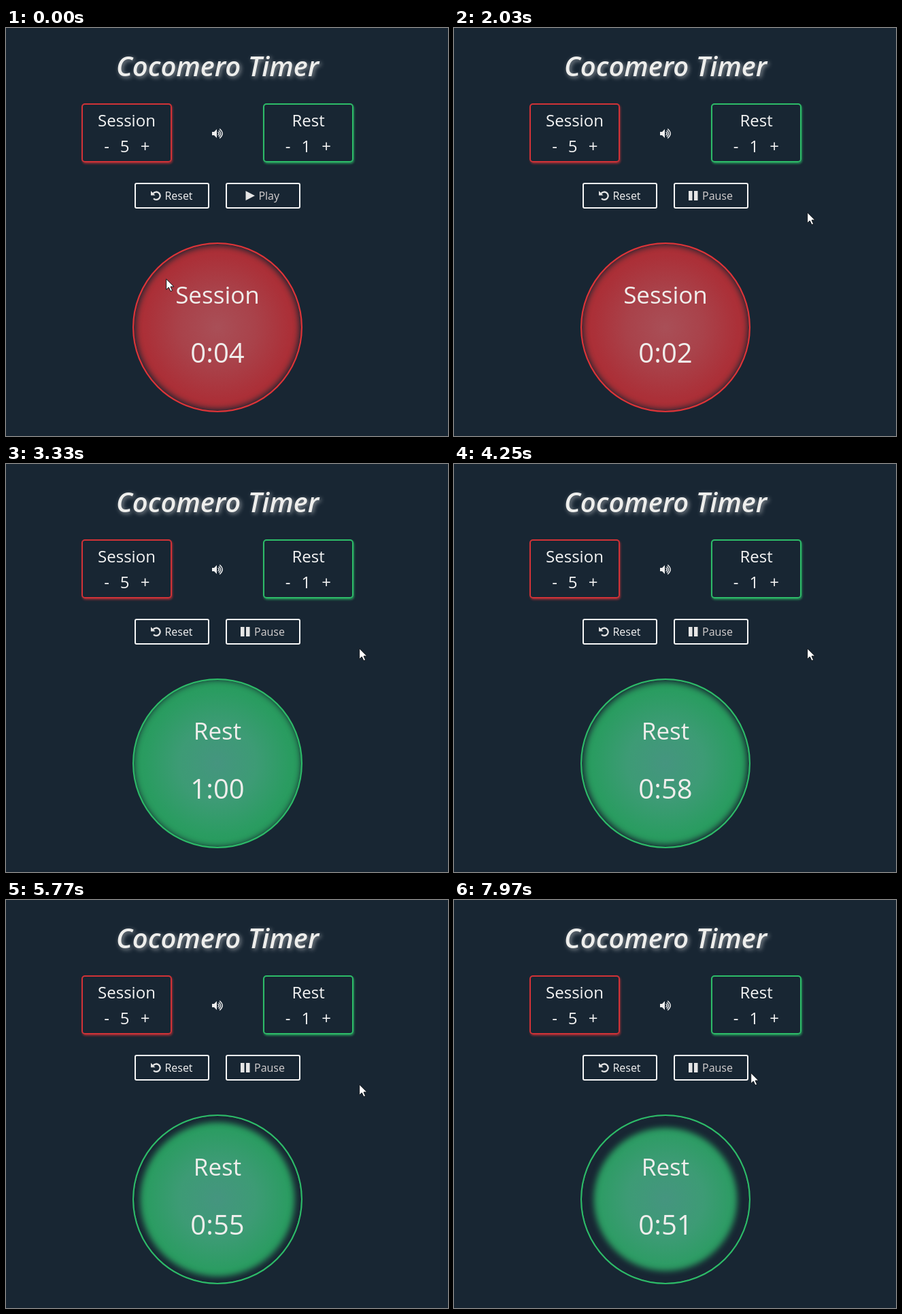
These frames come from a looping animation (650x601 px, 8 s). An HTML page:

```html
<!DOCTYPE html>
<html lang="en">
<head>
<meta charset="utf-8">
<title>Cocomero Timer</title>
<style>
  html, body { margin: 0; width: 100%; height: 100%; overflow: hidden; background: #182633; }
  #stage { position: absolute; left: 0; top: 0; width: 650px; height: 601px; overflow: hidden; }
  svg { position: absolute; left: 0; top: 0; }
  text { font-family: "Open Sans", "Noto Sans", sans-serif; fill: #f4f4f4; }
  .title { font-size: 40px; font-weight: 600; font-style: italic; fill: #eeeeec; text-shadow: 2px 2px 6px rgba(255, 255, 255, .5); }
  .setting { font-size: 24px; }
  .button { font-size: 16px; }
  .soft { fill: #d4d0d0; }
  .icon { fill: #e6e6e6; }
  .phase { font-size: 35px; fill: #f0eeec; }
  .time { font-size: 40px; fill: #f0eeec; }
  .box, #dial { position: absolute; box-sizing: border-box; border: 2px solid; }
  .box { top: 111px; width: 133px; height: 87px; border-radius: 5px; }
  #work { left: 111px; border-color: #d03237; box-shadow: 1px 2px 3px rgba(208, 50, 55, .65); }
  #pause { left: 378px; border-color: #2dbb68; box-shadow: 1px 2px 3px rgba(45, 187, 104, .65); }
  #dial { left: 186px; top: 316px; width: 250px; height: 250px; border-radius: 50%; }
  #dial.session { border-color: #df3438; background: radial-gradient(circle 125px, #a94f57, #a9424a 45%, #ab3038 85%, #ab2e34); }
  #dial.rest { border-color: #2dbb68; background: radial-gradient(circle 125px, #45957f, #3d9b75 45%, #2a9c61 85%, #279a5c); }
</style>
</head>
<body>
<div id="stage">
  <div class="box" id="work"></div>
  <div class="box" id="pause"></div>
  <div id="dial" class="session"></div>
  <svg width="650" height="601" viewBox="0 0 650 601">
    <text class="title" x="311" y="71" text-anchor="middle">Cocomero Timer</text>

    <g class="setting" text-anchor="middle">
      <text x="177.5" y="145">Session</text>
      <text x="148" y="183">-</text><text x="174.7" y="183">5</text><text x="204.5" y="183">+</text>
      <text x="444.5" y="145">Rest</text>
      <text x="414.5" y="183">-</text><text x="441.3" y="183">1</text><text x="471" y="183">+</text>
    </g>

    <g fill="none" stroke="#eeeeee" stroke-width="1.4" stroke-linecap="round">
      <path d="M303 153h3l4-4v13l-4-4h-3z" fill="#eeeeee" stroke="none"/>
      <path d="M312 153.4q2.3 2.1 0 4.2M313.3 151.2q4.6 4.3 0 8.6M314.6 149q7.2 6.5 0 13"/>
    </g>

    <g fill="none" stroke="#f6f6f6" stroke-width="2">
      <rect x="190" y="229" width="108" height="36" rx="2"/>
      <rect x="324" y="229" width="108" height="36" rx="2"/>
    </g>
    <path d="M216.5 243.7A5.7 5.7 0 1 1 217 251.3" fill="none" stroke="#e6e6e6" stroke-width="2.3"/>
    <path class="icon" d="M213 240v6.5h6.5z"/>
    <text class="button" x="233.4" y="253">Reset</text>
    <path id="mark" class="icon"/>
    <text id="action" class="button soft" y="253"></text>

    <text id="phase" class="phase" x="311" y="406" text-anchor="middle"></text>
    <text id="clock" class="time" x="311" y="493" text-anchor="middle"></text>

    <g id="arrow">
      <path d="M.7 .8V16.4L4.3 13L7 18.8L9.6 17.6L7 12H11.8Z" fill="#fff" stroke="#10161c" stroke-width="1"/>
    </g>
    <g id="hand">
      <path d="M5 13V2.5Q5 .6 6.6 .6T8.2 2.5V8Q8.5 6.8 9.8 7T11 8.5Q11.6 7.4 12.7 7.8T13.7 9.3Q14.5 8.5 15.4 9T16.4 11V15Q16.3 17.5 14.7 19V21.4H7V19.2L1.2 13.4Q0 11.7 1.3 11T3.6 11.6Z"
        fill="#fff" stroke="#10161c" stroke-width="1"/>
      <path d="M8.2 8v4M11 8.5V12M13.7 9.3V12.4" stroke="#10161c" stroke-width=".9"/>
    </g>
  </svg>
</div>
<script>
const LOOP = 8000, PRESS = 790, REST = 3330;
const $ = id => document.getElementById(id);

// Moments at which the countdown drops by one second
const workTicks = [1580, 2030, 2510, 2820];
const restTicks = [3760, 4250, 4850, 5310, 5770, 6230, 6700, 7330, 7800];

// Pointer stops: start time, x, y, shape
const stops = [
  [0, 235, 369, "arrow"], [170, 305, 309, "arrow"], [320, 329, 272, "arrow"],
  [470, 331, 262, "hand"], [640, 343, 248, "hand"], [960, 343, 246, "hand"],
  [1110, 347, 245, "hand"], [1260, 471, 258, "arrow"], [1430, 519, 271, "arrow"],
  [7970, 436, 254, "arrow"]
];

const passed = (ticks, t) => ticks.filter(x => x <= t).length;

function drawDial(t) {
  const rest = t >= REST;
  const gone = passed(restTicks, t);
  const left = rest ? 60 - gone : 4 - passed(workTicks, t);
  const spread = rest ? Math.max(0, gone * 2.06 - 1) : 1 + left * 125 / 300;
  $("dial").className = rest ? "rest" : "session";
  $("dial").style.boxShadow = `inset 0 0 9px ${spread}px #182633`;
  $("phase").textContent = rest ? "Rest" : "Session";
  $("clock").textContent = Math.floor(left / 60) + ":" + String(left % 60).padStart(2, "0");
}

function drawButton(t) {
  const running = t >= PRESS;
  $("action").textContent = running ? "Pause" : "Play";
  $("action").setAttribute("x", running ? 365 : 371.4);
  $("mark").setAttribute("d", running
    ? "M345 240h5.5v14h-5.5zM353 240h5.5v14h-5.5z"
    : "M352.5 240L366 247L352.5 254Z");
}

function drawPointer(t) {
  const [, x, y, shape] = stops[passed(stops.map(s => s[0]), t) - 1];
  for (const id of ["arrow", "hand"]) {
    $(id).setAttribute("transform", `translate(${x} ${y})`);
    $(id).setAttribute("display", id === shape ? "inline" : "none");
  }
}

function draw(t) {
  drawDial(t);
  drawButton(t);
  drawPointer(t);
}

let start;
function frame(now) {
  start ??= now;
  draw((now - start) % LOOP);
  requestAnimationFrame(frame);
}
draw(0);
requestAnimationFrame(frame);
</script>
</body>
</html>
```
